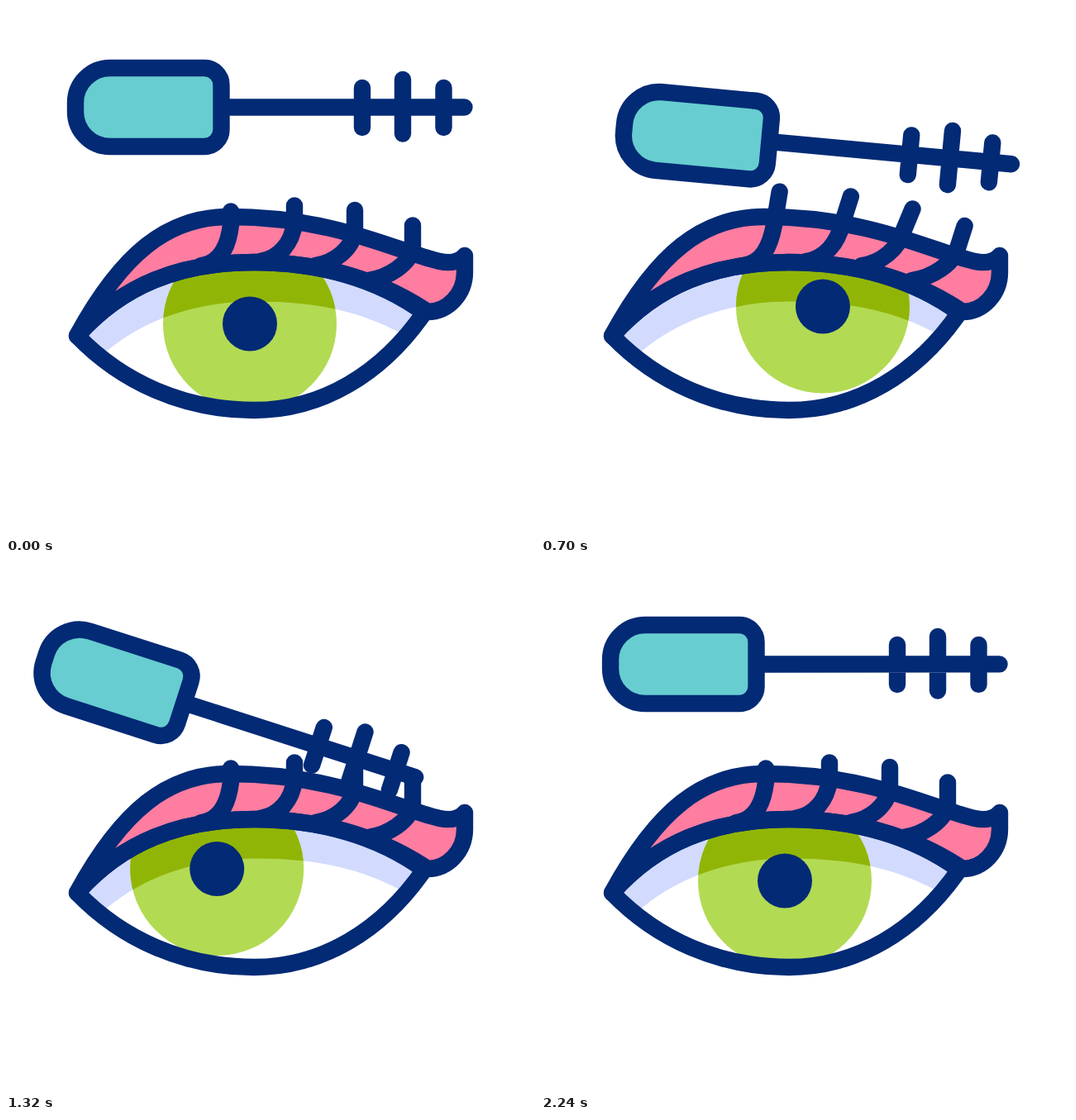
Animation, 640 px wide and 640 px high, one loop 2400 ms. Source, as an HTML page:

```html
<!DOCTYPE html>
<html lang="en">
<head>
<meta charset="utf-8">
<title>Mascara</title>
<style>
  html, body { margin: 0; height: 100%; overflow: hidden; background: #fff; }
  svg { display: block; width: 100vw; height: 100vh; }
  .line { fill: none; stroke: #032a75; stroke-width: 20.4; stroke-linecap: round; stroke-linejoin: round; }
</style>
</head>
<body>
<svg viewBox="0 0 640 640">
  <defs>
    <path id="eye" d="M86 399C140 338 210 310 300 310C378 310 450 330 506 371C455 445 382 489 300 489C215 489 140 455 86 399Z"/>
    <path id="shade" d="M70 460L119 420C165 380 230 357.500 300 357.500C375 357 430 370 480 397L530 420V290H70Z"/>
    <clipPath id="inEye"><use href="#eye"/></clipPath>
    <clipPath id="inShade"><use href="#shade"/></clipPath>
  </defs>

  <g clip-path="url(#inEye)">
    <use href="#shade" fill="#d2dbfd"/>
    <circle class="iris" r="105" fill="#b2da53"/>
    <g clip-path="url(#inShade)"><circle class="iris" r="105" fill="#91b507"/></g>
    <circle class="iris" r="33" fill="#032a75"/>
  </g>
  <path class="line" style="fill:#fe7da0" d="M86 399C140 300 195 255 270 255C400 255 480 300 525 309C540 312 550 308 555 302V322C555 348 535 370 510 370C450 330 378 310 300 310C210 310 140 338 86 399Z"/>
  <use href="#eye" class="line"/>
  <path id="lashes" class="line"/>

  <g id="brush" class="line">
    <path fill="#67cdd0" d="M126 75H240A20.500 20.500 0 0 1 260.500 95.500V149.500A20.500 20.500 0 0 1 240 170H126A42 42 0 0 1 84 128V117A42 42 0 0 1 126 75Z"/>
    <path d="M264 122.500H554.500M431 99V147M480 89V154.500M529.500 99V147"/>
  </g>
</svg>

<script>
const LOOP = 2400;

// Key poses; each move between two of them eases in and out.
const brushKeys = [
  { at: 0, x: 480, y: 122, turn: 0 },
  { at: 440, x: 405, y: 250, turn: 12 },
  { at: 890, x: 549, y: 144, turn: 1.3 },
  { at: 1425, x: 412, y: 245, turn: 19.5 },
  { at: 1930, x: 491.5, y: 84.7, turn: -4.9 },
  { at: 2250, x: 480, y: 122, turn: 0 }
];
const gazeKeys = [
  { at: 0, x: 295, y: 384.5 },
  { at: 440, x: 348.5, y: 363 },
  { at: 600, x: 348.5, y: 363 },
  { at: 1150, x: 255, y: 370 },
  { at: 1300, x: 255, y: 370 },
  { at: 1750, x: 295, y: 384.5 }
];
const strokes = [410, 1425];
const lashes = [
  { x: 272, tip: 248.5, bend: 265, base: 314 },
  { x: 349, tip: 241.5, bend: 263, base: 309 },
  { x: 422, tip: 247, bend: 272, base: 314 },
  { x: 492, tip: 265.5, bend: 292, base: 332 }
];

const brush = document.getElementById('brush');
const lashLines = document.getElementById('lashes');
const irisParts = document.querySelectorAll('.iris');

function pose(keys, t) {
  const next = keys.findIndex(key => t < key.at);
  if (next < 0) return keys[keys.length - 1];
  const a = keys[next - 1], b = keys[next];
  const ease = (1 - Math.cos(Math.PI * (t - a.at) / (b.at - a.at))) / 2;
  const mix = name => a[name] + (b[name] - a[name]) * ease;
  return { x: mix('x'), y: mix('y'), turn: mix('turn') };
}

// Bump of height 1 around the given delay after either stroke.
function swell(t, delay) {
  return strokes.reduce((sum, start) => {
    const u = (t - start - delay) / 230;
    return sum + (Math.abs(u) < 1 ? Math.cos(u * Math.PI / 2) ** 2 : 0);
  }, 0);
}

// The brush reaches the lashes one after another; each bends, then springs up.
function lashPath({ x, tip, bend, base }, i, t) {
  const delay = 190 + 60 * i;
  const dx = 28 * swell(t, delay);
  const lift = (24 - 10 * i) * swell(t, delay + 110);
  const baseX = x - 36 - 6 * i + dx * 0.5;
  return `M${x + dx} ${tip - lift}L${x + dx * 0.6} ${bend}` +
    `C${x - 3 + dx * 0.5} ${(bend + base) / 2} ${baseX + 24} ${base - 3} ${baseX} ${base}`;
}

function draw(now) {
  const t = now % LOOP;
  const { x, y, turn } = pose(brushKeys, t);
  brush.setAttribute('transform', `translate(${x} ${y}) rotate(${turn}) translate(-480 -122)`);
  const gaze = pose(gazeKeys, t);
  irisParts.forEach(part => {
    part.setAttribute('cx', gaze.x);
    part.setAttribute('cy', gaze.y);
  });
  lashLines.setAttribute('d', lashes.map((lash, i) => lashPath(lash, i, t)).join(''));
  requestAnimationFrame(draw);
}
draw(0);
</script>
</body>
</html>
```
